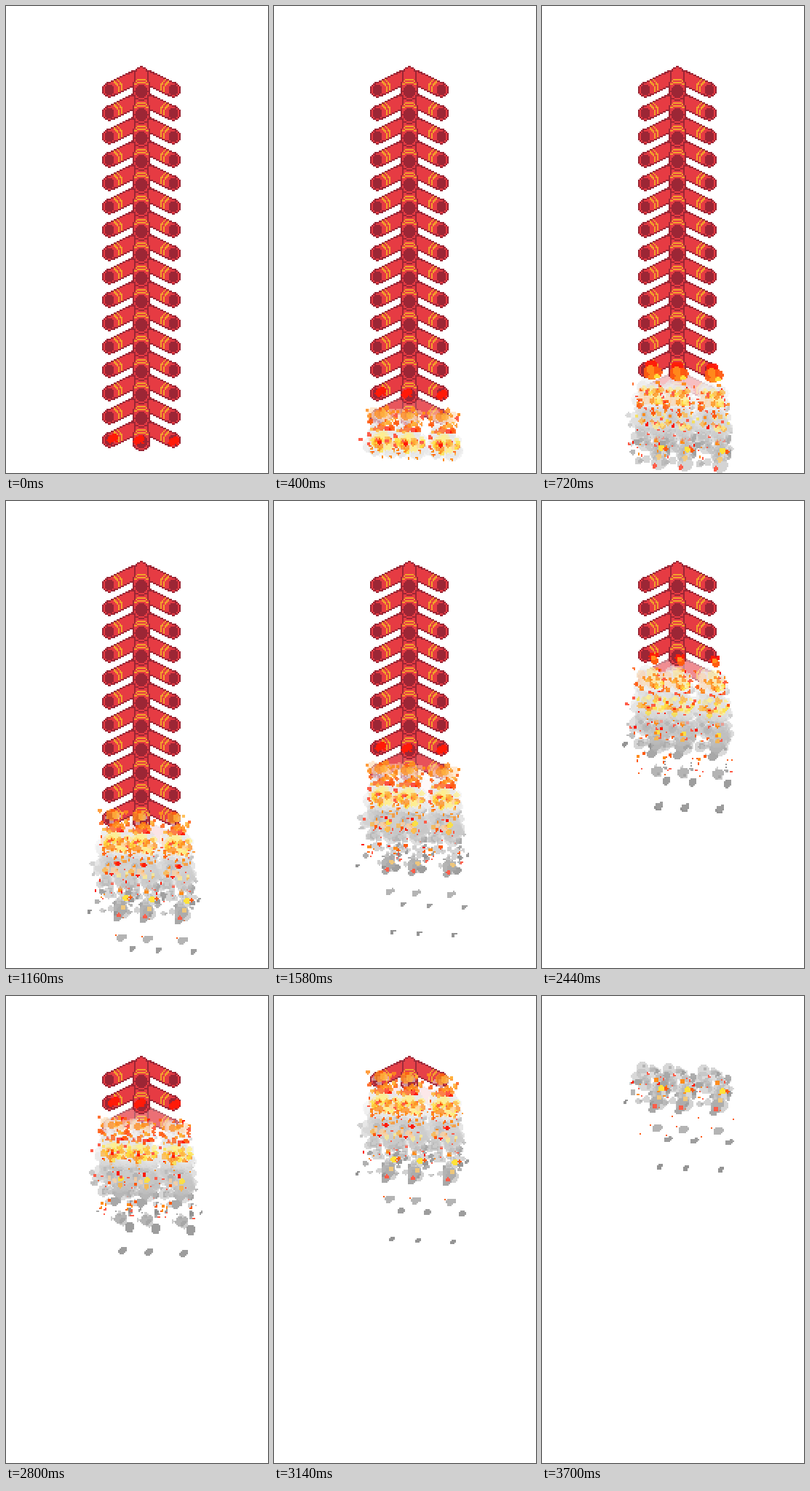
Animation, 360 px wide and 640 px high, one loop 3.72 s. Source, as an HTML page with a canvas:

```html
<!DOCTYPE html>
<html lang="en">
<head>
<meta charset="utf-8">
<title>Firecrackers</title>
<style>
  html, body { margin: 0; width: 100%; height: 100%; overflow: hidden; background: #fff; }
  canvas { display: block; width: 360px; height: 640px; image-rendering: pixelated; }
</style>
</head>
<body>
<canvas id="stage" width="180" height="320"></canvas>
<script>
const LOOP = 3720, STEP = 20, ROWS = 16, PITCH = 16, DELAY = 197.5;
const MID_X = 93, ARM = 22, CAP_Y = 57.5;
const BURST_X = 70.5, COLUMNS = [[0, 0], [18, 1], [42, 2]];
const RED = '#e63b43', DARK = '#9c2635', GOLD = '#f2a02c';
const HOT = '#ff1a08', FLAME = '#ff5a10', ORANGE = '#ff8c1c', AMBER = '#ffb53c';
const YELLOW = '#ffe23a', PALE = '#fff08c', PEACH = '#ffd2a0', SALMON = '#ff5c48';

const ctx = document.getElementById('stage').getContext('2d');

let seed = 88;
const rnd = (lo = 0, hi = 1) => {
  seed = (seed * 1664525 + 1013904223) % 4294967296;
  return lo + (hi - lo) * seed / 4294967296;
};
const pick = list => list[Math.floor(rnd(0, list.length))];
const clamp = (v, lo, hi) => Math.max(lo, Math.min(hi, v));

// Colour of one pixel of a tube; u runs from the cap along the axis, v across it.
function tubePixel(u, v, len, r0, r1, capU, capV, bands) {
  const r = r0 + (r1 - r0) * clamp(u / len, 0, 1);
  const d = Math.hypot(u - clamp(u, 0, len), v);
  if (d > r) return null;
  if (d > r - 1) return DARK;
  if (Math.hypot(u / capU, v / capV) < 1) return DARK;
  const arc = u + 0.07 * v * v;
  return bands.some(b => Math.abs(arc - b) < 0.5) ? GOLD : RED;
}

function makeRow() {
  const c = document.createElement('canvas');
  c.width = 180;
  c.height = 80;
  const g = c.getContext('2d');
  const cos = 0.905, sin = 0.425;
  const paint = (x, y, color) => {
    if (!color) return;
    g.fillStyle = color;
    g.fillRect(x, y, 1, 1);
  };
  for (let y = 38; y < 70; y++) {
    for (let x = 64; x < 122; x++) {
      const px = x + 0.5 - MID_X, py = y + 0.5 - CAP_Y;
      for (const dx of [ARM + px, ARM - px]) {
        paint(x, y, tubePixel(dx * cos - py * sin, dx * sin + py * cos, 24, 5.2, 5.2, 3.3, 3.8, [6.4, 9]));
      }
      paint(x, y, tubePixel(1 - py, px, 12.5, 6.4, 4.6, 4.6, 4.6, [6.2, 8.2]));
    }
  }
  return c;
}
const rowSprite = makeRow();

const parts = [];
const add = (b, e, x, y, r0, r1, color, vx = 0, vy = 0, alpha = 1) =>
  parts.push({ b, e, x, y, r0, r1, color, vx, vy, alpha });

// Billowing smoke
for (let i = 0; i < 44; i++) {
  parts.push({
    b: rnd(140, 350), e: rnd(700, 880), x: 4 + rnd(-9, 9), y: rnd(-4, 7),
    vx: rnd(-6, 6), vy: rnd(-15, 12), r: rnd(2.6, 5.8), shade: rnd(-14, 14), alpha: 0.52
  });
}
for (let i = 0; i < 22; i++) {
  const b = rnd(420, 760);
  parts.push({
    b, e: b + rnd(120, 280), x: rnd(-13, 18), y: rnd(-11, 11),
    vx: rnd(-3, 3), vy: rnd(0, 6), r: rnd(0.9, 2.4), shade: rnd(-20, 5), alpha: 0.9
  });
}

// Warm glow inside the smoke
for (let i = 0; i < 16; i++) {
  const b = rnd(180, 420);
  add(b, b + rnd(90, 170), 4 + rnd(-9, 9), rnd(-4, 5), rnd(3, 4.5), 2,
    pick([PALE, PEACH, PEACH]), 0, 1, 0.5);
}

// Ignition and first flame
for (const [x, y, r] of [[1, 0, 2.2], [4, -2, 2.6], [2, -1, 2.4], [5, 1, 1]]) add(0, 46, x, y, r, r, HOT, 1);
for (const [x, y, r, c] of [[5, 1, 2.8, HOT], [6.5, 4, 3, FLAME], [6, 2, 2, ORANGE], [8, 0, 1.3, HOT]])
  add(40, 104, x, y, r * 0.8, r, c, 1, 0);
for (const [x, y, r, c] of [[4.5, -3, 4.4, HOT], [4, 1, 4.8, FLAME], [8.5, 1, 3.6, FLAME],
  [4, -1, 3, ORANGE], [5.5, 4, 2.6, ORANGE], [8.5, 4, 1.6, YELLOW], [9, 8, 1.4, ORANGE]])
  add(98, 164, x, y, r, r, c, 0, 1, 0.95);
for (const [x, y, r, c] of [[2, -3, 4.5, ORANGE], [5, -3, 3.4, AMBER], [3, 6, 3.2, FLAME],
  [-1, 7, 2, FLAME], [7, 7, 2.2, HOT], [10, 6, 1.8, ORANGE]])
  add(150, 245, x, y, r, r * 0.5, c, 0, 2, 0.75);

// Fireball speckles
for (let i = 0; i < 46; i++) {
  const b = rnd(125, 330);
  add(b, b + rnd(60, 140), 4 + rnd(-11, 11), rnd(-7, 9), rnd(0.8, 2.2), 0.8,
    pick([FLAME, FLAME, ORANGE, ORANGE, AMBER]), rnd(-3, 3), rnd(-1, 3), 0.85);
}
for (let i = 0; i < 52; i++) {
  const b = rnd(230, 540);
  add(b, b + rnd(70, 150), 5 + rnd(-9, 9), rnd(-4, 6), rnd(1, 2.8), rnd(0.8, 1.8),
    pick([PALE, PALE, YELLOW, AMBER, PEACH, ORANGE]), rnd(-2, 2), rnd(0, 3), 0.72);
}

// Falling embers near the axis
add(470, 570, 6, -4, 1.6, 1.8, FLAME, 0, 3);
add(560, 630, 6.5, -1, 1.6, 1.4, HOT, 0, 1);
add(575, 690, 8, 2, 2, 1.8, YELLOW, 1, 4, 0.9);
add(580, 690, 7.5, 7, 2, 1.4, AMBER, 1, 3, 0.8);
add(655, 780, 8, -2, 2, 1.7, ORANGE, 0, 3);
add(670, 790, 11, 4, 2.4, 2, YELLOW, 1, 3);
add(680, 800, 9.5, 10, 2, 1.6, '#ffce70', 1, 4, 0.8);
add(690, 800, 6.5, 17, 1.8, 1.4, SALMON, 1, 2);
add(800, 950, 9, -8, 2, 1.2, YELLOW, 1, 6, 0.9);

// Scattered sparks
for (let i = 0; i < 60; i++) {
  const b = rnd(150, 800), wide = i % 5 ? 1 : 1.5;
  add(b, b + rnd(70, 180), 4 + rnd(-11, 11) * wide, rnd(-9, 12), rnd(0.6, 1.5), rnd(0.5, 1),
    pick([HOT, FLAME, SALMON, SALMON, ORANGE]), rnd(-4, 4), rnd(0, 5));
}
for (let i = 0; i < 4; i++) {
  const b = rnd(850, 1150);
  add(b, b + 110, rnd(-6, 22), rnd(-8, 6), 0.5, 0.5, FLAME, 1, 5);
}

// Lingering soot
const soot = (b, e, x, y, vx, vy, r0, r1, c = '#9d9d9d') => {
  add(b, e, x, y, r0, r1, c, vx, vy);
  add(b, e, x + r0 * 0.7, y - 1, r0 * 0.7, r1 * 0.6, c, vx, vy);
};
soot(800, 990, 7, -4, 0, 5, 4.6, 3.6, '#b3b3b3');
soot(800, 1010, 4, 3, 2, 2, 3.4, 2, '#a8a8a8');
soot(960, 1220, 7, -2, 1.5, 5, 4, 2, '#b4b4b4');
soot(1010, 1180, 14, 6, 2, 4, 2.6, 1.6);
soot(1180, 1400, 13, -14, 5, 10, 2.4, 1.3);
soot(1200, 1300, 9, 4, 1, 6, 2.6, 2);
soot(1420, 1602, 9, -9, 1.5, 8, 2.7, 1.1, '#949494');
soot(840, 1000, -14, -3, 0.5, 4, 1.6, 1.1, '#949494');
soot(740, 860, 19, 5, 3, 6, 1.3, 1);

// Hard-edged disc on the pixel grid.
function disc(cx, cy, r) {
  if (r < 0.75) return ctx.fillRect(Math.round(cx - 0.5), Math.round(cy - 0.5), 1, 1);
  for (let y = Math.floor(cy - r); y <= cy + r; y++) {
    const dy = y + 0.5 - cy;
    if (Math.abs(dy) > r) continue;
    const w = Math.sqrt(r * r - dy * dy);
    const left = Math.round(cx - w), width = Math.round(cx + w) - left;
    if (width > 0) ctx.fillRect(left, y, width, 1);
  }
}

function burst(age, row) {
  for (const p of parts) {
    if (age < p.b || age >= p.e) continue;
    const k = (age - p.b) / (p.e - p.b);
    let r = p.r0 + (p.r1 - p.r0) * k;
    if (p.r) {
      r = p.r * Math.min(1, 0.3 + 5 * k, 0.25 + 3 * (1 - k));
      const v = Math.round(clamp(232 - (age - 380) * 0.16, 158, 232) + p.shade);
      ctx.fillStyle = `rgb(${v},${v},${v})`;
    } else {
      ctx.fillStyle = p.color;
    }
    ctx.globalAlpha = p.alpha;
    for (const [dx, dy] of COLUMNS) {
      disc(BURST_X + dx + p.x + p.vx * k, CAP_Y + row * PITCH + dy + p.y + p.vy * k, r);
    }
  }
}

function draw(time) {
  const t = Math.floor(time % LOOP / STEP) * STEP;
  const age = row => t - (ROWS - 1 - row) * DELAY;
  ctx.globalAlpha = 1;
  ctx.fillStyle = '#fff';
  ctx.fillRect(0, 0, 180, 320);
  for (let row = ROWS - 1; row >= 0; row--) {
    ctx.globalAlpha = clamp(1 - (age(row) - 170) / 230, 0, 1);
    if (ctx.globalAlpha > 0) ctx.drawImage(rowSprite, 0, row * PITCH);
  }
  for (let row = ROWS - 1; row >= 0; row--) {
    if (age(row) >= 0) burst(age(row), row);
  }
}

function tick() {
  draw(performance.now());
  requestAnimationFrame(tick);
}
tick();
</script>
</body>
</html>
```
